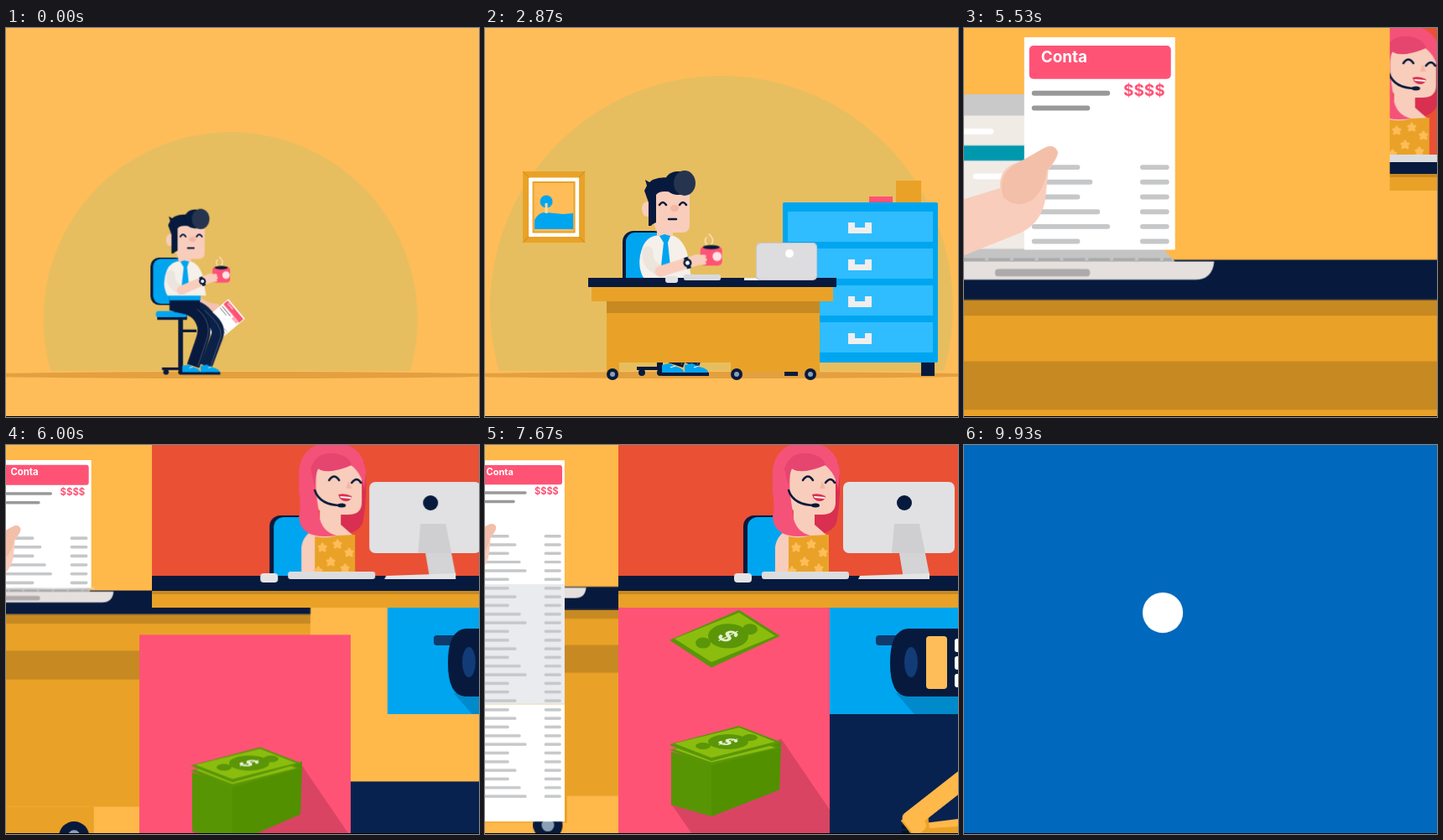
These frames come from a looping animation (564x464 px, 9990 ms). An HTML page:

```html
<!DOCTYPE html>
<html lang="pt">
<head>
<meta charset="utf-8">
<title>Conta</title>
<style>
html, body { margin: 0; width: 100%; height: 100%; overflow: hidden; background: #ffbd59; }
svg { display: block; width: 564px; height: 464px; }
text { font: 700 19px Inter, sans-serif; }
.a { animation: 9.99s linear infinite; }
.out { animation-timing-function: cubic-bezier(.33, 1, .68, 1); }
.io { animation-timing-function: cubic-bezier(.37, 0, .63, 1); }
.navy { fill: #071a3d; } .blue { fill: #00a5f0; } .gold { fill: #e9a227; }
.brown { fill: #c78922; } .skin { fill: #f9cdbb; } .pink { fill: #ff5376; }
.line { fill: none; stroke: #071a3d; stroke-width: 2.5; stroke-linecap: round; }

/* Office */
#office { animation-name: office; }
@keyframes office {
  0%, 45% { transform: none; }
  48.5%, 100% { transform: translate(-1336px, -989px) scale(4.76); }
}
#officeCut { animation-name: first; }
@keyframes first { 0%, 48.4% { visibility: visible; } 48.41%, 100% { visibility: hidden; } }
.grow { transform-origin: 207px 408px; animation-name: grow; }
@keyframes grow { 0% { transform: scale(.808); } 25%, 100% { transform: none; } }
#frame { animation-name: frame; }
@keyframes frame { 0% { transform: translateX(-124px); } 38%, 100% { transform: none; } }
#cabinet { animation-name: cabinet; }
@keyframes cabinet { 0% { transform: translateX(250px); } 30%, 100% { transform: none; } }
#desk { animation-name: desk; }
@keyframes desk { 0% { transform: translateX(460px); } 36%, 100% { transform: none; } }
.lean { transform-origin: 205px 305px; animation-name: lean; }
@keyframes lean { 0%, 8%, 27%, 100% { transform: none; } 14%, 21% { transform: rotate(7deg); } }
#fore { animation-name: fore; }
@keyframes fore {
  0%, 8%, 27% { transform: translate(215px, 288px) rotate(-23deg); }
  14%, 21% { transform: translate(231px, 293px) rotate(-61deg); }
  32%, 100% { transform: translate(214px, 290px) rotate(-2deg); }
}
#cup { animation-name: cup; }
@keyframes cup {
  0%, 8%, 27% { transform: translate(44px, 0) rotate(23deg); }
  14%, 21% { transform: translate(44px, 0) rotate(61deg); }
  32%, 100% { transform: translate(44px, 0) rotate(2deg); }
}
#sheet { animation-name: sheet; }
@keyframes sheet {
  0%, 30% { transform: translate(279px, 303px) rotate(50deg); }
  36%, 100% { transform: translate(296px, 210px); }
}
#reach { animation-name: reach; }
@keyframes reach {
  0%, 30% { transform: translate(232px, 302px) rotate(25deg) scaleX(.6); }
  36%, 100% { transform: translate(268px, 286px) rotate(-58deg); }
}
#shut { animation-name: shut; }
@keyframes shut { 0%, 29.9% { opacity: 1; } 30%, 100% { opacity: 0; } }
#open { animation-name: open; }
@keyframes open { 0%, 29.9% { opacity: 0; } 30%, 100% { opacity: 1; } }

/* Close-up */
#close { animation-name: second; }
@keyframes second { 0%, 48.4% { visibility: hidden; } 48.41%, 100% { visibility: visible; } }
#near { animation-name: near; }
@keyframes near {
  0%, 53.5% { transform: translate(7.6px, -1.6px) scale(1.0645); }
  61%, 100% { transform: translate(-51px, 10.5px) scale(.57); }
}
#held { animation-name: held; }
@keyframes held {
  0%, 53.5% { transform: translate(7.9px, -1.8px) scale(1.063); }
  61%, 100% { transform: translate(-52.4px, 11.8px) scale(.58); }
}
#fold1 { transform-origin: 0 265px; animation-name: fold1; }
@keyframes fold1 { 0%, 60% { transform: scaleY(0); } 65% { transform: scaleY(1.02); } 68% { transform: scaleY(.97); } 72%, 100% { transform: none; } }
#fold2 { transform-origin: 254px 513px; animation-name: fold2; }
@keyframes fold2 { 0%, 63% { transform: scaleY(0); } 68% { transform: skewY(-2.4deg) scaleY(.9); } 72%, 100% { transform: none; } }

/* Panels */
#top { animation-name: top; }
@keyframes top { 0%, 53.5% { transform: translateX(407px); } 61%, 100% { transform: none; } }
#topIn { animation-name: topIn; }
@keyframes topIn { 0%, 53.5% { transform: translateX(-238px); } 61%, 100% { transform: none; } }
#cash { animation-name: cash; }
@keyframes cash { 0%, 57% { transform: translateY(272px); } 63%, 100% { transform: none; } }
#mobile { animation-name: mobile; }
@keyframes mobile { 0%, 58% { transform: translateX(155px); } 64%, 100% { transform: none; } }
#phone { animation-name: phone; }
@keyframes phone { 0%, 59% { transform: translateY(145px); } 65%, 100% { transform: none; } }
#pile { transform-origin: 0 443px; animation-name: pile; }
@keyframes pile { 0%, 71% { transform: none; } 73%, 100% { transform: scaleY(.91); } }
#notes { animation-name: notes; }
@keyframes notes { 0%, 71% { visibility: hidden; } 71.01%, 100% { visibility: visible; } }
.fall { animation: fall 1.11s linear infinite; }
@keyframes fall {
  0% { transform: translate(286px, 115px) scaleY(2.4); }
  75% { transform: translate(286px, 327px); }
  85%, 100% { transform: translate(286px, 356px); }
}
#ring { animation-name: ring; }
@keyframes ring {
  0%, 70%, 78%, 81% { transform: translate(585px, 425px) rotate(70.7deg); }
  73%, 75%, 84%, 100% { transform: translate(563px, 344px) rotate(17deg); }
}

/* Ending */
#end { animation-name: end; }
@keyframes end { 0%, 92.5% { transform: translateY(464px); } 95.5%, 100% { transform: none; } }
#dot { transform-origin: 237px 200px; animation-name: dot; }
@keyframes dot { 0%, 97% { transform: scale(0); } 100% { transform: none; } }
</style>
</head>
<body>
<svg viewBox="0 0 564 464">
<defs>
  <clipPath id="floor"><path d="M-100-100H664V409H-100z"/></clipPath>
  <clipPath id="cTop"><path d="M159 0H564V194H159z"/></clipPath>
  <clipPath id="cCash"><path d="M159 194H411V464H159z"/></clipPath>
  <clipPath id="cMobile"><path d="M411 194H564V321H411z"/></clipPath>
  <clipPath id="cPhone"><path d="M411 321H564V464H411z"/></clipPath>
  <g id="bill">
    <path d="M73 11H254V266H73z" fill="#fff"/>
    <rect class="pink" x="79" y="21" width="170" height="40" rx="5"/>
    <text x="93" y="41.500" fill="#fff">Conta</text>
    <text class="pink" x="192" y="81">$$$$</text>
    <path d="M85 78H173M85 96H149" stroke="#999" stroke-width="6" stroke-linecap="round"/>
    <g id="rows0"></g>
  </g>
  <g id="drawer">
    <path d="M361 219H534V255H361z" fill="#2fbdff"/>
    <path d="M433 232h8v6h12v-6h8v13h-28z" fill="#f1eeee"/>
  </g>
  <g id="wheel"><circle class="navy" r="7"/><circle r="3" fill="#8ba0b5"/></g>
  <g id="note">
    <path d="M-66 1L17-21 66-2-16 21z" fill="#5a9608"/>
    <path d="M-60 0L17-19 60-2-16 17z" fill="#8bbd0e"/>
    <ellipse rx="24" ry="9" transform="translate(4 -2)" fill="#5a9608"/>
    <ellipse cx="-26" cy="3" rx="9" ry="4" fill="#5a9608"/>
    <ellipse cx="30" cy="-7" rx="9" ry="4" fill="#5a9608"/>
    <text y="7" text-anchor="middle" transform="matrix(1 .4 -1.3 .4 4 -2)" fill="#e7efd2">$</text>
  </g>
  <path id="flower" d="M0-4L1-1 4-1 2 1 3 4 0 2-3 4-2 1-4-1-1-1z" fill="#ffbd59" stroke="#ffbd59" stroke-width="3" stroke-linejoin="round"/>
</defs>

<g id="officeCut" class="a"><g id="office" class="a io">
  <path d="M0 0H564V464H0z" fill="#ffbd59"/>
  <g clip-path="url(#floor)"><g class="a out grow"><circle cx="282" cy="333" r="276" fill="#e6be60"/></g></g>
  <ellipse cx="275" cy="414" rx="330" ry="4" fill="#e3a040"/>

  <g id="frame" class="a out">
    <path class="gold" d="M47 171H121V256H47z"/>
    <path d="M47 171l9 9M121 171l-9 9M47 256l9-9M121 256l-9-9" stroke="#c78922"/>
    <path d="M56.500 181H111.500V246.500H56.500z" fill="#ffbd59" stroke="#fff" stroke-width="5"/>
    <path d="M59.500 184H108.500V243.500H59.500z" fill="none" stroke="#e9a227" stroke-width="2"/>
    <circle class="blue" cx="75" cy="207" r="7.500"/>
    <path class="blue" d="M61 240V229Q66 219 75 220T95 222L107 221V240z"/>
    <path d="M75 209V221" stroke="#ffdca0" stroke-width="3"/>
  </g>

  <g id="cabinet" class="a out">
    <path class="navy" d="M357 398h16v17h-16zM520 398h16v17h-16z"/>
    <path class="pink" d="M458 201h28v8h-28z"/>
    <path class="gold" d="M490 182h30v27h-30z"/>
    <rect class="blue" x="355" y="208" width="185" height="191" rx="2"/>
    <use href="#drawer"/><use href="#drawer" y="44"/><use href="#drawer" y="88"/><use href="#drawer" y="132"/>
  </g>

  <g class="a out grow">
    <rect class="navy" x="164" y="242" width="50" height="70" rx="13"/>
    <rect class="blue" x="168" y="244" width="48" height="66" rx="11"/>
    <path class="navy" d="M174 326h44v8h-44zM205 331h7v75h-7zM212 348h20v4h-20zM181 404h36v4h-36z"/>
    <rect class="blue" x="172" y="321" width="46" height="9" rx="4"/>
    <circle class="navy" cx="187" cy="411" r="4"/><circle class="navy" cx="209" cy="411" r="4"/>
    <g id="reach" class="a io"><path d="M0 0Q28 8 54 0" fill="none" stroke="#f4c2ae" stroke-width="12" stroke-linecap="round"/></g>
    <g id="sheet" class="a io"><use href="#bill" transform="scale(.21) translate(-73 -11)"/></g>
    <g fill="none" stroke-linejoin="round">
      <path d="M203 313Q236 308 250 330 268 345 262 359L246 402" stroke="#0b2148" stroke-width="18"/>
      <path d="M200 313Q232 316 240 336 246 348 240 364L227 402" stroke="#071a3d" stroke-width="19"/>
      <path d="M214 310Q238 316 246 334 253 349 246 366L234 402M244 320Q270 342 268 358L253 402" stroke="#53627c" stroke-width="1"/>
    </g>
    <path class="navy" d="M192 300h45v17l-24 8-21-5z"/>
    <path class="blue" d="M192 297h46v8h-46z"/>
    <path class="blue" d="M211 412V402l9-2 8 4q9 2 10 8zM238 412V402l9-2 8 4q11 2 12 8z"/>
    <path class="navy" d="M211 411h27v4h-27zM238 411h29v4h-29z"/>
    <path d="M221 405l6-2M249 405l6-2" stroke="#fff"/>

    <g class="a io lean">
      <path d="M189 298Q180 282 188 261 194 247 209 247H222Q235 250 241 268L246 298z" fill="#f5f0ea"/>
      <path class="skin" d="M205 235h19v12l-8 5-11-5z"/>
      <path class="blue" d="M208 248l6-2 7 2-3 8 3 28-5 8-6-8 3-28z"/>
      <ellipse class="skin" cx="193" cy="216" rx="6" ry="9"/>
      <path class="skin" d="M202 191H244V235q0 9-9 9H213q-11 0-11-12z"/>
      <path class="navy" d="M195 236V208l-5-14 3-6-2-7 5 3 4-3Q212 176 225 180L240 196 214 195Q207 195 204 199V232q-5 2-6 4z"/>
      <ellipse class="navy" cx="230" cy="185" rx="16" ry="14"/>
      <ellipse cx="238" cy="185" rx="13" ry="15" fill="#26344f"/>
      <ellipse cx="226" cy="215" rx="5" ry="4" fill="#f3b6a5"/>
      <g id="shut" class="a">
        <path class="line" d="M208 211q4-6 8 0M232 211q4-6 8 0M219 228h9"/>
      </g>
      <g id="open" class="a">
        <circle cx="212" cy="210" r="6" fill="#fff"/><circle cx="237" cy="211" r="6" fill="#fff"/>
        <circle class="navy" cx="212" cy="210" r="2.800"/><circle class="navy" cx="238" cy="211" r="2.800"/>
        <path class="navy" d="M218 226h14v4q-7 5-14 0z"/><path d="M220 227h10v2h-10z" fill="#fff"/>
        <path class="line" d="M206 200q5-4 9-1M233 200q5-3 8 1"/>
      </g>
    </g>
    <path d="M194 267Q192 283 211 291" fill="none" stroke="#ece5de" stroke-width="13" stroke-linecap="round"/>
    <g id="fore" class="a io">
      <path d="M-6 0H40" stroke="#f9cdbb" stroke-width="13" stroke-linecap="round"/>
      <path d="M28-7V7" stroke="#071a3d" stroke-width="5"/><circle class="navy" cx="28" r="5"/><circle cx="28" r="2.500" fill="#fff"/>
      <g id="cup" class="a io">
        <path d="M8-17q-5-5 0-9M13-17q5-6-3-13" fill="none" stroke="#ffe1c4" stroke-width="1.500"/>
        <rect class="pink" y="-15" width="26" height="23" rx="5"/>
        <ellipse class="navy" cx="13" cy="-14" rx="10" ry="2.500"/>
        <circle cx="20" cy="-3" r="5.500" fill="#ffe3e3"/>
        <path d="M-2-3H5M-2 1H6M-1 5H5" stroke="#f9cdbb" stroke-width="4" stroke-linecap="round"/>
      </g>
    </g>
  </g>

  <g id="desk" class="a out">
    <path class="gold" d="M123 309H411V326H395V410H289V399H156V410H141V326H123z"/>
    <path class="brown" d="M141 326H395V340H141z"/>
    <path class="navy" d="M119 298H415V309H119z"/>
    <use href="#wheel" x="148" y="413"/><use href="#wheel" x="296" y="413"/><use href="#wheel" x="384" y="413"/>
    <rect x="211" y="296" width="15" height="8" rx="3" fill="#e3e3e5"/>
    <rect x="233" y="294" width="44" height="7" rx="2" fill="#d9dadd"/>
    <path d="M305 298h30v3h-30z" fill="#eee"/>
    <rect x="319" y="256" width="73" height="45" rx="5" fill="#c6c7ca"/>
    <rect x="320" y="257" width="71" height="43" rx="5" fill="#dddde0"/>
    <circle cx="359" cy="269" r="5" fill="#fff"/>
  </g>
</g></g>

<g id="close" class="a">
  <path d="M0 0H564V464H0z" fill="#ffb84a"/>
  <g id="near" class="a io">
    <path class="gold" d="M-60 326H700V716H-60z"/>
    <path class="brown" d="M-60 326H700V345H-60zM-60 400H700V458H-60z"/>
    <path class="gold" d="M-60 716H261V772H-60z"/>
    <use href="#wheel" transform="translate(221 777) scale(4.400)"/>
    <path class="navy" d="M-60 278H700V326H-60z"/>
    <path d="M-60 79H230V266H-60z" fill="#c9c9c9"/>
    <path d="M-60 105H215V266H-60z" fill="#f1ebe5"/>
    <path d="M-60 141H215V159H-60z" fill="#0098ae"/>
    <path d="M-60 124H33M15 178H150" stroke="#fff" stroke-width="7" stroke-linecap="round"/>
    <path d="M-60 265H240L254 280H-60z" fill="#c4c4c4"/>
    <path d="M-60 278H250" stroke="#aaa" stroke-width="4" stroke-dasharray="26 4"/>
    <path d="M-60 280H301Q299 302 278 302H-60z" fill="#e5e0de"/>
    <rect x="38" y="289" width="114" height="9" rx="4" fill="#aeaaa9"/>
  </g>
  <g id="held" class="a io">
    <g id="fold1" class="a">
      <path d="M73 265H254V513H73z" fill="#e9ebee"/><g id="rows1"></g>
      <g id="fold2" class="a"><path d="M73 513H254V754H73z" fill="#fff"/><g id="rows2"></g></g>
    </g>
    <use href="#bill"/>
    <path class="skin" d="M-60 224L44 192Q42 165 70 160L95 145Q108 137 113 148 115 154 102 170L99 200Q96 232 70 245L0 273-60 285z"/>
    <path d="M48 203Q40 176 63 163L95 145Q108 137 113 148 114 154 100 171 98 193 82 207 62 217 48 203z" fill="#f3bfa9"/>
  </g>

  <g id="top" class="a io"><g clip-path="url(#cTop)"><g id="topIn" class="a io">
    <path d="M0 0H820V194H0z" fill="#ea5034"/>
    <rect class="navy" x="308" y="84" width="60" height="80" rx="13"/>
    <rect class="blue" x="313" y="86" width="60" height="80" rx="12"/>
    <path d="M378 20H421Q426 60 419 93 412 108 385 108z" fill="#d92f50"/>
    <path class="skin" d="M368 75h25v20l16 14V156H346V122q2-18 22-23z"/>
    <path class="gold" d="M362 109Q376 112 388 108L410 107V156H362z"/>
    <use href="#flower" x="371" y="122"/><use href="#flower" x="389" y="118"/><use href="#flower" x="403" y="128"/><use href="#flower" x="381" y="139"/><use href="#flower" x="398" y="147"/><use href="#flower" x="366" y="150"/>
    <path class="skin" d="M362 15H418V68Q418 83 402 83H378Q362 80 362 62z"/>
    <path d="M343 86Q346 74 343 55V30Q347-3 383-3 419-3 423 32L421 54Q419 34 404 23 376 36 366 28 362 35 364 60L368 88Q372 104 388 108 345 114 343 86z" fill="#f5527a"/>
    <path d="M357 28Q364 7 386 10 402 12 406 24 378 36 366 28 362 35 362 50z" fill="#e64570"/>
    <path class="line" d="M379 42q6-9 12 0M406 45q6-8 11 0"/>
    <path d="M402 43l4 9h-7z" fill="#f3b6a5"/>
    <path d="M390 59q8-2 16 2-1 6-7 6-7 0-9-8z" fill="#d92f50"/><path d="M392 61l13 1v2l-12-1z" fill="#fff"/>
    <path class="line" stroke-width="3" d="M362 54Q368 72 394 72"/><ellipse class="navy" cx="394" cy="72" rx="5" ry="2.500"/>
    <path class="navy" d="M0 156H820V174H0z"/>
    <path class="gold" d="M0 174H820V194H0z"/><path class="brown" d="M0 174H820V178H0z"/>
    <path d="M488 94H518L530 155 499 159z" fill="#d4d4d6"/><path d="M447 156L530 153V160H445z" fill="#e4e4e6"/>
    <rect x="427" y="44" width="133" height="85" rx="7" fill="#e1e1e3"/>
    <path d="M488 94H518L525 129H485z" fill="#cfcfd1"/>
    <circle class="navy" cx="500" cy="69" r="9"/>
    <rect x="330" y="151" width="104" height="9" rx="3" fill="#dcdcdf"/>
    <rect x="297" y="153" width="21" height="11" rx="4" fill="#e4e4e6"/>
  </g></g></g>

  <g id="cash" class="a out"><g clip-path="url(#cCash)">
    <path class="pink" d="M159 194H411V464H159z"/>
    <path d="M222 428L247 464H411V435L353 350z" fill="#d94463"/>
    <g id="pile" class="a">
      <path d="M222 358L270 372 353 345 351 408 270 443 222 428z" fill="#589505"/>
      <path d="M270 376V443L351 408 353 345z" fill="#529000"/>
      <use href="#note" x="286" y="355"/><use href="#note" x="286" y="349"/>
    </g>
    <g id="notes" class="a">
      <g class="fall"><use href="#note"/></g>
      <g class="fall" style="animation-delay:-.555s"><use href="#note"/></g>
    </g>
  </g></g>

  <g id="mobile" class="a out"><g clip-path="url(#cMobile)">
    <path class="blue" d="M411 194H564V321H411z"/>
    <path d="M490 296L512 321H564V296z" fill="#0089cb"/>
    <rect x="466" y="227" width="30" height="12" rx="4" fill="#103a6b"/>
    <path class="navy" d="M504 219H570V300H504Q483 299 483 260 483 221 504 219z"/>
    <ellipse cx="508" cy="259" rx="8" ry="18" fill="#123c78"/>
    <rect x="526" y="228" width="25" height="63" rx="4" fill="#ffbd59"/>
    <g fill="#fff"><rect x="560" y="231" width="15" height="16" rx="3"/><rect x="560" y="252" width="15" height="16" rx="3"/><rect x="560" y="273" width="15" height="16" rx="3"/></g>
  </g></g>

  <g id="phone" class="a out"><g clip-path="url(#cPhone)">
    <path d="M411 321H564V464H411z" fill="#08224f"/>
    <path d="M501 464q-4-18 15-20 13-2 17-14" fill="none" stroke="#03132f" stroke-width="8" stroke-dasharray="4 2"/>
    <path d="M508 464L516 452 564 446V464z" fill="#ffb84a"/><path class="gold" d="M508 464L514 458 564 455V464z"/>
    <g id="ring" class="a io">
      <path class="gold" d="M-6-12H20V12H8V68L20 76V96H-10z"/>
      <rect x="-14" y="-12" width="22" height="104" rx="8" fill="#ffb84a"/>
      <rect x="-14" y="74" width="30" height="20" rx="7" fill="#ffb84a"/>
    </g>
  </g></g>
</g>

<g id="end" class="a out">
  <path d="M0 0H564V464H0z" fill="#0068bd"/>
  <g id="dot" class="a"><circle cx="237" cy="200" r="30" fill="#fff"/></g>
</g>
<path d="M0 463H564V464H0z"/>
</svg>
<script>
const widths = [58, 73, 58, 82, 94, 58];

function fillRows(id, y, count) {
  let d = '';
  for (let i = 0; i < count; i++) {
    const row = y + i * 17.8;
    d += `M85 ${row}h${widths[i % 6] - 6}M215 ${row}h29`;
  }
  document.getElementById(id).innerHTML =
    `<path d="${d}" stroke="#c6c7c9" stroke-width="6" stroke-linecap="round"/>`;
}

fillRows('rows0', 167, 6);
fillRows('rows1', 274, 14);
fillRows('rows2', 524, 11);
</script>
</body>
</html>
```
